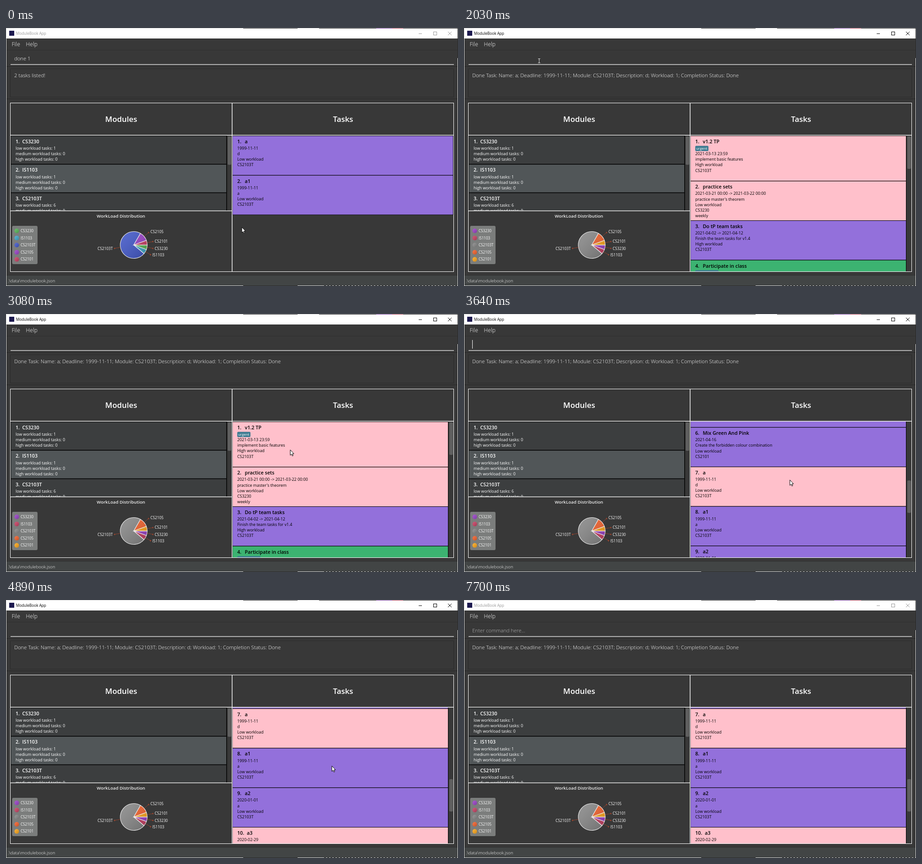
An HTML page with a canvas for the animation above (7740 ms loop, 989 px wide and 566 px high).

```html
<!DOCTYPE html>
<html lang="en">
<head>
<meta charset="utf-8">
<title>ModuleBook App</title>
<style>
html, body { margin: 0; width: 100%; height: 100%; overflow: hidden; background: #383838; }
canvas { display: block; }
</style>
</head>
<body>
<canvas id="stage" width="989" height="566"></canvas>
<script>
const LOOP = 7740;
const g = document.getElementById('stage').getContext('2d');
const BG = '#383838', PINK = '#ffc0cb', PURPLE = '#9370db', GREEN = '#3cb371';
const PALETTE = ['#f3622d', '#fba71b', '#57b757', '#41a9c9', '#4258c9', '#9a42c8', '#c84164', '#888888'];

const modules = [['CS3230', 1], ['IS1103', 1], ['CS2103T', 6]];
const shares = [['CS3230', 1], ['IS1103', 1], ['CS2103T', 13], ['CS2105', 2], ['CS2101', 1]];
const task = (color, name, lines, tag) => ({ color, name, lines, tag });
const low = (date, text, module = 'CS2103T') => [date, text, 'Low workload', module];

const found = [
  task(PURPLE, 'a', low('1999-11-11', 'd')),
  task(PURPLE, 'a1', low('1999-11-11', 'a')),
];
const tasks = [
  task(PINK, 'v1.2 TP', ['2021-03-13 23:59', 'implement basic features', 'High workload', 'CS2103T'], 'urgent'),
  task(PINK, 'practice sets', [...low('2021-03-21 00:00 -> 2021-03-22 00:00', "practice master's theorem", 'CS3230'), 'weekly']),
  task(PURPLE, 'Do tP team tasks', ['2021-04-02 -> 2021-04-12', 'Finish the team tasks for v1.4', 'High workload', 'CS2103T']),
  task(GREEN, 'Participate in class', ['2021-04-23 10:10', 'Contribute to discussions', 'Medium workload', 'CS2105', 'weekly'], 'Participation'),
  task(PURPLE, 'PAQ', low('2021-04-10', 'Answer pre-class quiz questions')),
  task(PURPLE, 'Mix Green And Pink', low('2021-04-16', 'Create the forbidden colour combination', 'CS2101')),
  task(PINK, 'a', low('1999-11-11', 'd')),
  task(PURPLE, 'a1', low('1999-11-11', 'a')),
  task(PURPLE, 'a2', low('2020-01-01', 'a')),
  task(PINK, 'a3', low('2020-02-29', 'a')),
];

// Timeline: pointer stops, wheel steps and caret spans, all in ms
const pointer = [[30, 516, 437], [490, 164, 72], [2260, 164, 72], [2560, 623, 300], [2740, 623, 300],
  [2880, 622, 298], [3130, 622, 298], [3400, 713, 364], [5550, 713, 364], [6350, 518, 284],
  [6770, 518, 284], [7100, 526, 570]];
const wheel = [[0, 0], [2600, 37], [2640, 75], [2690, 112], [2740, 150], [2880, 112], [2930, 75], [3030, 37], [3080, 0]];
for (let i = 1; i <= 11; i++) wheel.push([3079 + 51 * i, 446.5 * i / 11]);
wheel.push([3690, 479], [4570, 511], [4890, 543.5]);
const caret = [[530, 1040], [1420, 1870], [2380, 2880], [3370, 3870], [4380, 4890], [5340, 5850], [6350, 6860], [7380, 7700]];

const smooth = u => u * u * (3 - 2 * u);
const clamp = u => Math.max(0, Math.min(1, u));
const scrollAt = t => wheel.filter(s => s[0] <= t).pop()[1];

function pointerAt(t) {
  const i = pointer.findIndex(k => k[0] > t);
  if (i < 0) return pointer[pointer.length - 1].slice(1);
  if (!i) return pointer[0].slice(1);
  const [t0, x0, y0] = pointer[i - 1], [t1, x1, y1] = pointer[i];
  const u = smooth((t - t0) / (t1 - t0));
  return [x0 + (x1 - x0) * u, y0 + (y1 - y0) * u];
}

function easeBoth(u) {
  u = clamp(u);
  return u < 0.2 ? 3.125 * u * u : u > 0.8 ? 1 - 3.125 * (1 - u) ** 2 : 1.25 * u - 0.125;
}

function box(x, y, w, h, color) {
  g.fillStyle = color;
  g.fillRect(x, y, w, h);
}

function round(x, y, w, h, r, color) {
  g.fillStyle = color;
  g.beginPath();
  g.roundRect(x, y, w, h, r);
  g.fill();
}

function frame(x, y, w, h, color) {
  g.strokeStyle = color;
  g.lineWidth = 1;
  g.strokeRect(x + 0.5, y + 0.5, w, h);
}

// y is the middle of the capitals
function text(s, x, y, size, color = '#fff', weight = 400, align = 'left') {
  g.font = `${weight} ${size}px "Open Sans", "Noto Sans", sans-serif`;
  g.textAlign = align;
  g.fillStyle = color;
  g.fillText(s, x, y + size * 0.357);
}

function clipped(x, y, w, h, draw) {
  g.save();
  g.beginPath();
  g.rect(x, y, w, h);
  g.clip();
  draw();
  g.restore();
}

function heading(n, name, y, color) {
  const x = color === '#fff' ? 21 : 506;
  text(n + '.', x, y, 10.7, color, 600);
  text(name, x + (n > 9 ? 21 : color === '#fff' ? 14.5 : 16.5), y, 10.7, color, 600);
}

function desktop() {
  box(0, 0, 989, 566, '#d8d8d8');
  for (const y of [0, 565]) box(519, y, 119, 1, '#2b2b2b');
  box(685, 0, 304, 1, '#222');
  box(810, 0, 35, 1, '#7a3fa0');
  box(845, 0, 24, 1, '#b03a50');
  box(988, 0, 1, 66, '#2b2b2b');
  for (let x = 696; x < 985; x += 7) box(x, 565, 4, 1, '#333');
}

function titleBar(active) {
  const ink = active ? '#000' : '#999';
  box(1, 1, 987, 22, '#fff');
  box(7, 6, 11, 11, '#1d1a4f');
  text('ModuleBook App', 22, 12, 8.2, ink);
  box(903, 12, 7, 1, ink);
  frame(935, 8, 7, 7, ink);
  g.beginPath();
  g.moveTo(967, 8); g.lineTo(975, 16);
  g.moveTo(975, 8); g.lineTo(967, 16);
  g.stroke();
}

function chrome(t) {
  box(1, 23, 987, 542, BG);
  text('File', 12.5, 35.5, 12.2, '#fff', 300);
  text('Help', 43.5, 35.5, 12.2, '#fff', 300);
  box(1, 48, 987, 1, '#2f2f2f');
  box(10, 79.5, 970, 1.2, '#fff');
  box(1, 84, 987, 1, '#262626');
  frame(9, 89, 970, 62, '#2b2b2b');
  box(1, 155, 987, 1, '#262626');
  box(1, 543, 987, 22, '#424545');
  box(1, 542, 987, 1, '#303030');
  text('.\\data\\modulebook.json', 4, 555, 9.7, '#fff', 300);

  if (t < 1420) text('done 1', 18, 66.5, 11.3, '#fff', 300);
  if (t >= 7700) text('Enter command here...', 18, 66.5, 11.3, '#bbb', 300);
  if (caret.some(c => t >= c[0] && t < c[1])) box(t < 1420 ? 53 : 18, 57, 1, 19, '#fff');
  text(t < 1420 ? '2 tasks listed!'
    : 'Done Task: Name: a; Deadline: 1999-11-11; Module: CS2103T; Description: d; Workload: 1; Completion Status: Done',
    18, 103.5, 11.3, '#fff', 300);
  text('Modules', 252, 200, 16.9, '#fff', 600, 'center');
  text('Tasks', 737.5, 200, 16.9, '#fff', 600, 'center');
}

function moduleList() {
  clipped(10, 236, 484, 165, () => {
    modules.forEach(([name, count], i) => {
      const y = 236 + i * 62.6;
      box(10, y, 473.5, 63, '#000');
      box(11, y + 1, 471, 61, i % 2 ? '#515658' : '#3c3e3f');
      heading(i + 1, name, y + 13, '#fff');
      ['low', 'medium', 'high'].forEach((level, k) =>
        text(`${level} workload tasks: ${k ? 0 : count}`, 21, y + 28 + k * 12.1, 8.85));
    });
    round(485, 238, 8, 62, 2, '#5f5f5f');
  });
}

function taskList(list, scroll) {
  const long = list.length > 2, width = long ? 471 : 482;
  clipped(495, 236, 485, 299, () => {
    let y = 236 - scroll;
    list.forEach((item, i) => {
      const h = item.tag ? 99.3 : 86.7;
      box(495, y, width + 2, h + 0.8, '#000');
      box(496, y + 1, width, h - 1, item.color);
      heading(i + 1, item.name, y + 13, '#000');
      if (item.tag) {
        g.font = '400 7.9px "Open Sans", "Noto Sans", sans-serif';
        round(506, y + 22.5, g.measureText(item.tag).width + 4.5, 11.5, 2, '#3e7b91');
        text(item.tag, 508, y + 28.5, 7.9);
      }
      item.lines.forEach((s, k) => text(s, 506, y + 28 + (k + (item.tag ? 1 : 0)) * 12.1, 8.85, '#000'));
      y += h;
    });
    if (long) round(970, 238 + scroll * 0.285, 8, 71, 2, '#5f5f5f');
  });
}

const CX = 279.5, CY = 476;

function shade(x, y, r) {
  const s = g.createLinearGradient(x - r, y - r, x + r, y + r);
  s.addColorStop(0, 'rgba(255,255,255,.12)');
  s.addColorStop(1, 'rgba(0,0,0,.2)');
  g.fillStyle = s;
  g.fill();
}

function slice(a0, a1, r, color) {
  if (r < 0.5 || a1 - a0 < 0.005) return;
  g.beginPath();
  g.moveTo(CX, CY);
  g.arc(CX, CY, r, a0, a1);
  g.closePath();
  g.fillStyle = color;
  g.fill();
  shade(CX, CY, r);
  g.strokeStyle = '#eee';
  g.lineWidth = 1.1;
  g.stroke();
}

function pieLabel(name, a, r, alpha) {
  const c = Math.cos(a), s = Math.sin(a), side = c < 0 ? -1 : 1;
  const x = CX + (r + 13) * c, y = CY + (r + 13) * s;
  g.strokeStyle = g.fillStyle = '#97452f';
  g.lineWidth = 0.9;
  g.beginPath();
  g.moveTo(CX + r * c, CY + r * s);
  g.lineTo(x, y);
  g.stroke();
  g.beginPath();
  g.arc(x, y, 1.5, 0, 7);
  g.fill();
  g.globalAlpha = alpha;
  text(name, x + side * 4, y + 2 * s, 8.3, '#fff', 400, side < 0 ? 'right' : 'left');
  g.globalAlpha = 1;
}

function pieChart(t) {
  const changed = t >= 1420;
  const p = changed ? easeBoth((t - 1340) / 500) : 0;
  const fade = clamp((t - 1840) / 150);
  const R = p > 0 && p < 1 ? 31 : 29.5;
  const sets = [
    { part: p, r: R * p, first: 5, alpha: fade },
    { part: 1 - p, r: R * (1 - p) ** 2.5, first: 2, alpha: 1 },
  ];
  let a = 0;
  const labels = [];
  for (const set of sets) {
    shares.forEach(([name, n], i) => {
      const w = n / 18 * set.part * Math.PI * 2;
      slice(a, a + w, set.r, PALETTE[(set.first + i) % 8]);
      if (w > 0.157) labels.push([name, a + w / 2, set.alpha]);
      a += w;
    });
  }
  let last;
  for (const [name, mid, alpha] of labels) {
    const y = (R + 13) * Math.sin(mid), side = Math.cos(mid) > 0;
    if (last && last.side === side && Math.abs(y - last.y) < 11) continue;
    last = { y, side };
    pieLabel(name, mid, R, alpha);
  }

  text('WorkLoad Distribution', 251.5, 413, 9.7, '#eee', 600, 'center');
  round(13.5, 434, 55.5, 84, 3, '#7b7d7c');
  shares.forEach(([name], i) => {
    const y = 445 + i * 15.65;
    g.beginPath();
    g.arc(23.5, y, 5, 0, 7);
    g.fillStyle = PALETTE[((changed ? 5 : 2) + i) % 8];
    g.fill();
    shade(23.5, y, 5);
    text(name, 32, y, 8.1);
  });
}

function borders() {
  frame(9, 164, 970, 370, '#fff');
  box(9, 234.6, 971, 1.4, '#fff');
  box(494, 164, 1.4, 371, '#fff');
  box(9, 400.5, 485, 1.3, '#fff');
}

function cursor(x, y) {
  g.save();
  g.translate(x, y);
  g.lineWidth = 1;
  g.beginPath();
  if (y > 50 && y < 84) {
    g.strokeStyle = '#ddd';
    g.moveTo(-2, -4.5); g.lineTo(3, -4.5);
    g.moveTo(0.5, -4.5); g.lineTo(0.5, 4.5);
    g.moveTo(-2, 4.5); g.lineTo(3, 4.5);
  } else {
    g.fillStyle = '#fff';
    g.strokeStyle = '#000';
    [[0, 0], [0, 12], [2.7, 9.5], [4.5, 13.5], [6.3, 12.7], [4.6, 8.8], [8, 8.6]].forEach(q => g.lineTo(...q));
    g.closePath();
    g.fill();
  }
  g.stroke();
  g.restore();
}

function draw() {
  const t = performance.now() % LOOP;
  desktop();
  titleBar(t >= 530 && t < 7700);
  chrome(t);
  moduleList();
  taskList(t < 1420 ? found : tasks, scrollAt(t));
  pieChart(t);
  borders();
  cursor(...pointerAt(t));
  requestAnimationFrame(draw);
}
draw();
</script>
</body>
</html>
```
